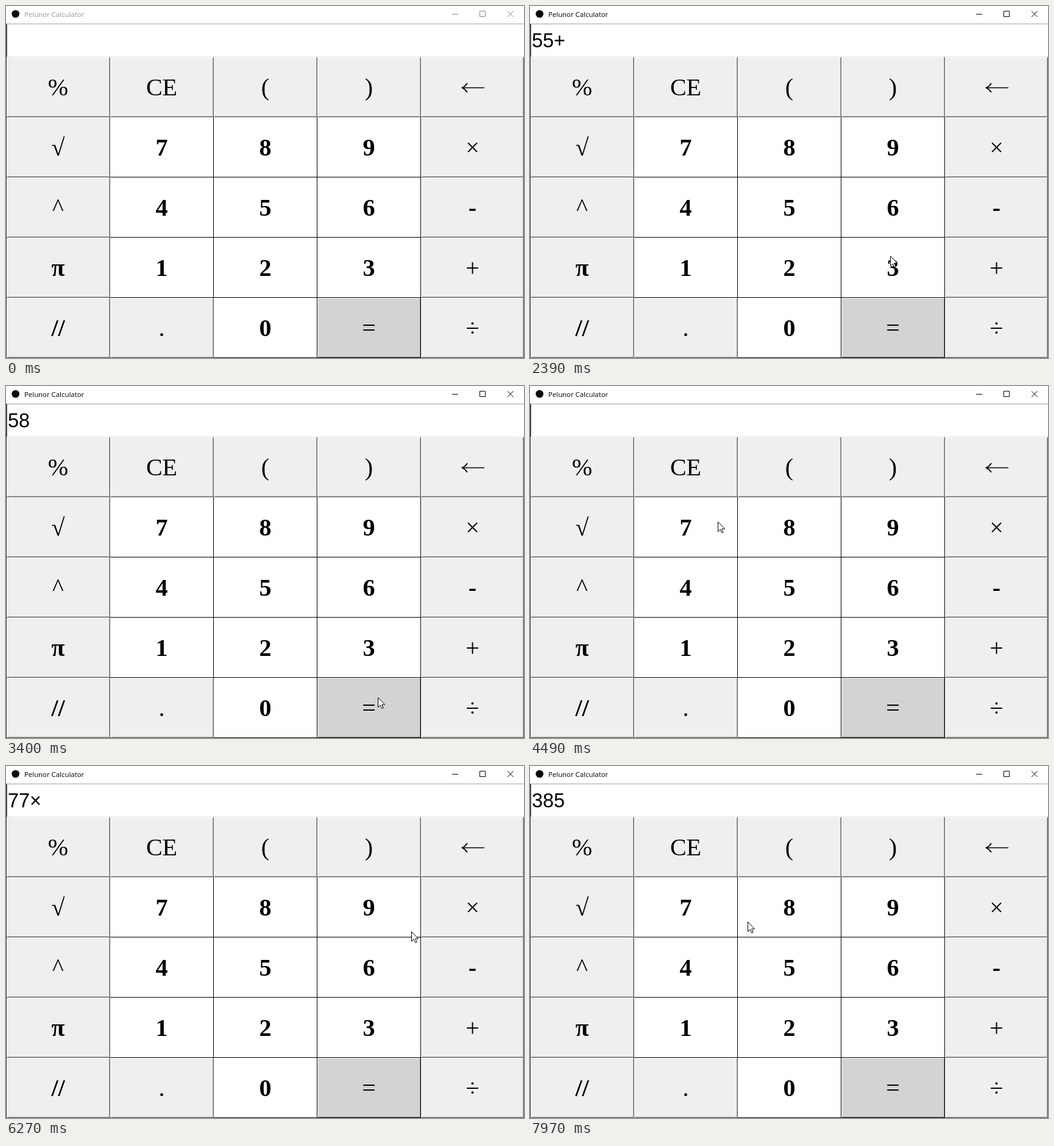
An HTML page that plays this animation: 850x579 px, repeating every 8 s.

```html
<!DOCTYPE html>
<html lang="en">
<head>
<meta charset="utf-8">
<title>Calculator</title>
<style>
  html, body { margin: 0; width: 100%; height: 100%; overflow: hidden; background: #fff; }
  svg { display: block; }
  text { white-space: pre; }
  .key { font: 40px "Liberation Serif", serif; text-anchor: middle; }
  .bold { font-weight: bold; }
  .entry { font: 32.4px "Liberation Sans", sans-serif; }
  .title { font: 11.4px "Open Sans", sans-serif; }
  .crisp { shape-rendering: crispEdges; }
</style>
</head>
<body>
<svg id="stage" width="850" height="579" viewBox="0 0 850 579"></svg>
<script>
const LOOP = 8000;
const stage = document.getElementById("stage");

function add(parent, tag, attrs, text) {
  const node = document.createElementNS("http://www.w3.org/2000/svg", tag);
  for (const name in attrs) node.setAttribute(name, attrs[name]);
  if (text !== undefined) node.textContent = text;
  parent.appendChild(node);
  return node;
}

function box(parent, x, y, width, height, fill) {
  return add(parent, "rect", { x, y, width, height, fill, class: "crisp" });
}

// Window chrome
box(stage, 0, 0, 850, 579, "#fff");
add(stage, "circle", { cx: 15.7, cy: 13, r: 6.3, fill: "#0b0b0d" });
const title = add(stage, "text", { x: 30, y: 18, class: "title" }, "Pelunor Calculator");
const controls = add(stage, "path", {
  d: "M732 13.5h10M777.5 8.5h9v9h-9zM823 8.5l9.5 9.5M832.5 8.5l-9.5 9.5", fill: "none"
});
const edge = box(stage, 0, 29, 1, 550, "#24364a");

// Entry field
box(stage, 1, 29, 849, 1, "#a0a0a0");
box(stage, 1, 30, 1, 53, "#696969");
box(stage, 1, 83, 849, 1, "#e3e3e3");
const entry = add(stage, "text", { x: 3, y: 68, class: "entry" }, "");

// Keypad
const STYLES = {
  gray: { face: "#edf0ef", light: "#fff", outer: "#696969", inner: "#a0a0a0" },
  white: { face: "#fff", light: "#fff", outer: "#000", inner: "#fff" },
  equal: { face: "#d3d3d3", light: "#fff", outer: "#000", inner: "#7f7f7f" }
};
const SUNKEN = { face: "#f0f0f0", light: "#a0a0a0", lightIn: "#696969", outer: "#fff", inner: "#e3e3e3" };
const ROWS = ["% CE ( ) ←", "√ 7 8 9 ×", "^ 4 5 6 -", "π 1 2 3 +", "// . 0 = ÷"];
const keys = {};

function makeKey(label, col, row) {
  const x = 1 + col * 170, y = 84 + row * 99;
  const w = col === 4 ? 169 : 170, h = 99;
  const digit = /\d/.test(label);
  const g = add(stage, "g", {});
  const parts = {
    face: box(g, x, y, w, h),
    inner: add(g, "path", { d: `M${x + 1.5} ${y + h - 1.5}H${x + w - 1.5}V${y + 1}`, class: "crisp", fill: "none" }),
    lightIn: add(g, "path", { d: `M${x + 1.5} ${y + h - 2}V${y + 1.5}H${x + w - 2}`, class: "crisp", fill: "none" }),
    light: add(g, "path", { d: `M${x + .5} ${y + h - 1}V${y + .5}H${x + w - 1}`, class: "crisp", fill: "none" }),
    outer: add(g, "path", { d: `M${x} ${y + h - .5}H${x + w - .5}V${y}`, class: "crisp", fill: "none" })
  };
  const face = add(g, "g", {});
  if (label === "←") {
    add(face, "path", {
      d: "M749 134.5H785M757 127Q754 132 748.5 134.5Q754 137 757 142",
      fill: "none", stroke: "#000", "stroke-width": 1.7
    });
  } else {
    const bold = digit || ["π", "-", "//"].includes(label);
    add(face, "text", { x: x + 84.5, y: y + 63, class: bold ? "key bold" : "key" }, label);
  }
  const style = digit ? STYLES.white : label === "=" ? STYLES.equal : STYLES.gray;
  keys[label] = { parts, face, style };
  paintKey(label, false);
}

function paintKey(label, down) {
  const { parts, face, style } = keys[label];
  const look = down ? SUNKEN : style;
  parts.face.setAttribute("fill", look.face);
  for (const name of ["light", "lightIn", "inner", "outer"]) {
    parts[name].setAttribute("stroke", look[name] || look.face);
  }
  face.setAttribute("transform", down ? "translate(1 1)" : "translate(0 0)");
}

ROWS.forEach((line, row) => line.split(" ").forEach((label, col) => makeKey(label, col, row)));

// Pointer
const pointer = add(stage, "g", {});
const halo = add(pointer, "circle", { cx: 0, cy: 0, r: 12.3, fill: "#ff0", "fill-opacity": .55 });
add(pointer, "path", {
  d: "M.5 .5V16.5L4.2 13L6.8 18.6L9.2 17.5L6.7 12H11.6Z",
  fill: "#fff", stroke: "#000", "stroke-width": 1
});

// Key presses: down, up, key, entry text after release
const PRESSES = [
  [910, 1080, "5", "5"], [1150, 1230, "5", "55"], [2010, 2160, "+", "55+"],
  [2560, 2710, "3", "55+3"], [3320, 3400, "=", "58"], [4260, 4330, "CE", ""],
  [4720, 4870, "7", "7"], [4950, 5030, "7", "77"], [5790, 5960, "×", "77×"],
  [6800, 6880, "5", "77×5"], [7660, 7740, "=", "385"]
];

// Pointer moves: first step, last step, step count, x, y, optional easing power
const MOVES = [
  [70, 70, 1, 680, 524], [150, 300, 3, 415, 323, .7], [450, 450, 1, 412, 319],
  [1380, 1840, 7, 754, 456], [2240, 2390, 3, 591, 411], [2790, 3170, 6, 610, 512],
  [3470, 4090, 9, 290, 150], [4410, 4570, 3, 314, 248],
  [5180, 5330, 3, 540, 301, 1.4], [5410, 5560, 3, 788, 251, .7], [5640, 5710, 2, 784, 244],
  [6040, 6730, 10, 446, 324], [6960, 6960, 1, 446, 327], [7030, 7510, 7, 574, 536],
  [7810, 7970, 3, 357, 256, .8]
];

function pointerAt(t) {
  let x = 680, y = 524;
  for (const [start, end, count, toX, toY, power] of MOVES) {
    if (t < start) break;
    const gap = count > 1 ? (end - start) / (count - 1) : 1;
    const step = t >= end ? count : Math.floor((t - start) / gap) + 1;
    const u = step / count;
    const k = power ? u ** power : u * u * (3 - 2 * u);
    x += (toX - x) * k;
    y += (toY - y) * k;
  }
  return [Math.round(x), Math.round(y)];
}

let held = null;

function draw(t) {
  let down = null, value = "";
  for (const [start, end, label, result] of PRESSES) {
    if (t >= end) value = result;
    else if (t >= start) down = label;
  }
  if (down !== held) {
    if (held) paintKey(held, false);
    if (down) paintKey(down, true);
    held = down;
  }
  entry.textContent = value;

  const active = t >= PRESSES[0][0];
  title.setAttribute("fill", active ? "#000" : "#999");
  controls.setAttribute("stroke", active ? "#000" : "#888");
  edge.setAttribute("fill", active ? "#222b35" : "#24364a");

  const [x, y] = pointerAt(t);
  pointer.setAttribute("transform", `translate(${x} ${y})`);
  pointer.setAttribute("visibility", t < MOVES[0][0] ? "hidden" : "visible");
  halo.setAttribute("opacity", down ? 1 : 0);
}

const begin = performance.now();
function tick() {
  draw((performance.now() - begin) % LOOP);
  requestAnimationFrame(tick);
}
draw(0);
requestAnimationFrame(tick);
</script>
</body>
</html>
```
